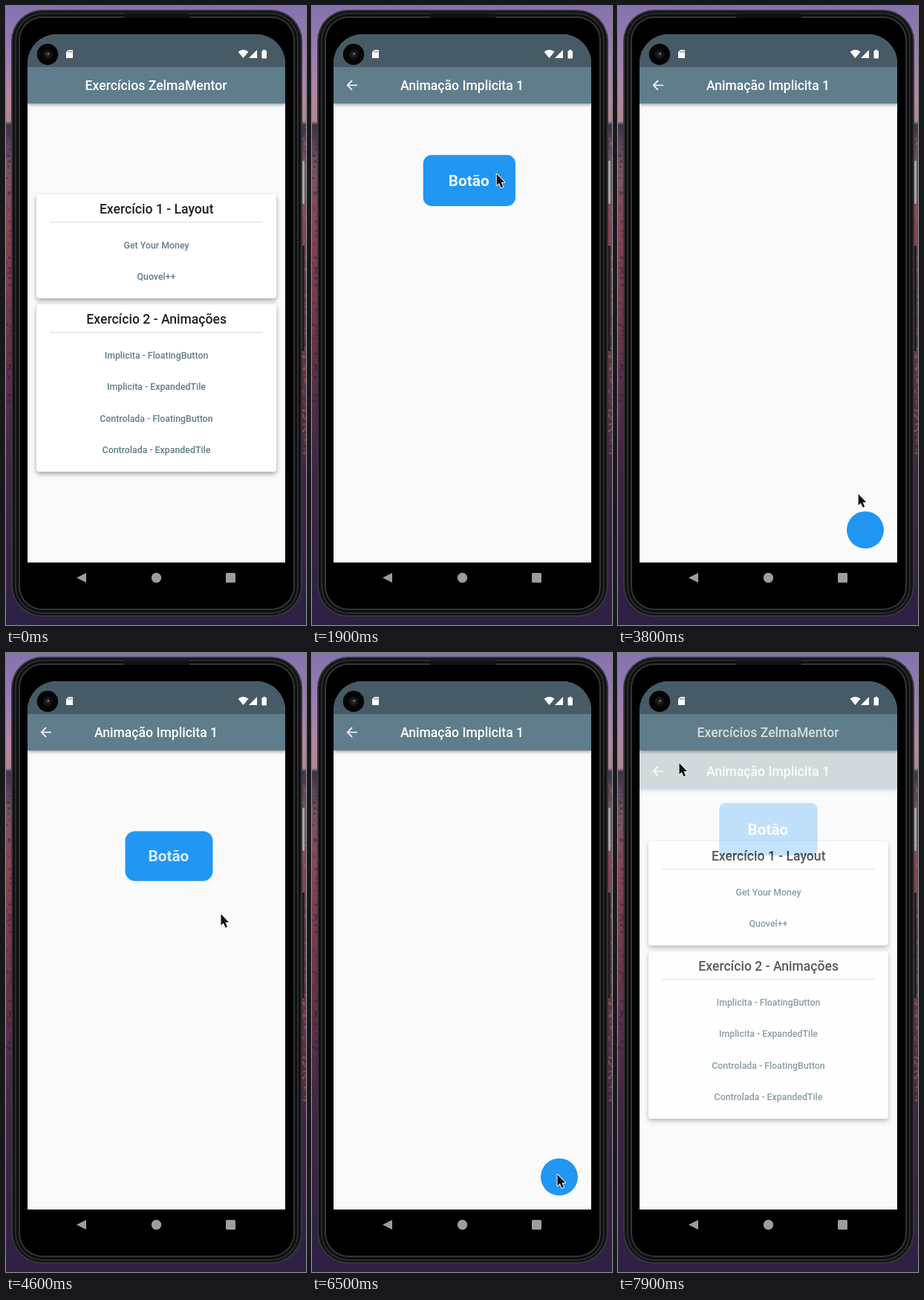
An HTML page with a canvas for the animation above (8000 ms loop, 404 px wide and 832 px high).

```html
<!DOCTYPE html>
<html lang="pt">
<head>
<meta charset="utf-8">
<title>Exercícios</title>
<style>
html, body { margin: 0; width: 100%; height: 100%; overflow: hidden; background: #000; }
canvas { display: block; width: 404px; height: 832px; }
</style>
</head>
<body>
<canvas id="stage" width="404" height="832"></canvas>
<script>
const W = 404, H = 832, LOOP = 8000, STEP = 100;
const ctx = document.getElementById('stage').getContext('2d');
const BG = '#fafafa', BAR = '#5f7d8b', STATUS = '#465b65', BLUE = '#2196f3';

function layer() {
  const c = document.createElement('canvas');
  c.width = W;
  c.height = H;
  return c.getContext('2d');
}

function pageLayer() {
  const c = layer();
  c.rect(29, 38, 347, 710);
  c.clip();
  return c;
}

const clamp = (v, a = 0, b = 1) => Math.min(b, Math.max(a, v));
const mix = (a, b, p) => a + (b - a) * p;

function bezier(x1, y1, x2, y2) {
  const at = (a, b, u) => 3 * a * u * (1 - u) ** 2 + 3 * b * u * u * (1 - u) + u ** 3;
  return x => {
    let lo = 0, hi = 1;
    for (let i = 0; i < 24; i++) {
      const mid = (lo + hi) / 2;
      if (at(x1, x2, mid) < x) lo = mid; else hi = mid;
    }
    return at(y1, y2, (lo + hi) / 2);
  };
}
const slideEase = bezier(0.4, 0, 0.2, 1);
const fadeEase = bezier(0.42, 0, 1, 1);

function box(c, x, y, w, h, r, fill) {
  c.beginPath();
  c.roundRect(x, y, w, h, r);
  c.fillStyle = fill;
  c.fill();
}

function disc(c, x, y, r, fill) {
  c.beginPath();
  c.arc(x, y, r, 0, Math.PI * 2);
  c.fillStyle = fill;
  c.fill();
}

function poly(c, pts, fill) {
  c.beginPath();
  pts.forEach(([x, y]) => c.lineTo(x, y));
  c.closePath();
  c.fillStyle = fill;
  c.fill();
}

function text(c, str, x, y, size, fill, weight = 500) {
  c.font = `${weight} ${size}px Roboto, sans-serif`;
  c.textAlign = 'center';
  c.fillStyle = fill;
  c.fillText(str, x, y);
}

function shadow(c, blur, dy, color) {
  c.shadowBlur = blur;
  c.shadowOffsetY = dy;
  c.shadowColor = color;
}

function noShadow(c) {
  c.shadowColor = 'transparent';
}

// Wallpaper and phone body
function drawPhone(c) {
  const g = c.createLinearGradient(0, 0, 0, H);
  [[0, '#8472ae'], [0.08, '#9c7eb2'], [0.15, '#b487a0'], [0.186, '#ae8694'], [0.192, '#3c3548'],
   [0.26, '#795566'], [0.36, '#844553'], [0.55, '#66354b'], [0.75, '#3e2642'], [1, '#2d2045']]
    .forEach(([p, col]) => g.addColorStop(p, col));
  c.fillStyle = g;
  c.fillRect(0, 0, W, H);

  let seed = 7;
  const rnd = () => (seed = seed * 16807 % 2147483647) / 2147483647;
  const tones = ['#b56a66', '#29203a', '#8a5c70', '#4a2a48'];
  c.globalAlpha = 0.45;
  for (let i = 0; i < 260; i++) {
    const y = 162 + rnd() * 440;
    c.fillStyle = tones[i % 4];
    c.fillRect(i % 2 ? rnd() * 8 : 398 + rnd() * 6, y, 1 + rnd() * 3, 1 + rnd() * 3);
  }
  c.globalAlpha = 1;

  box(c, 399, 208, 3, 58, 1, '#a2a4aa');
  box(c, 398, 322, 4, 142, 1, '#1e1f22');

  [[7, 5, '#35373a'], [9, 7, '#101112'], [12, 9, '#2a2c2d'], [14, 11, '#0d0e0e'],
   [17, 14, '#333536'], [19, 16, '#000']].forEach(([x, y, col]) =>
    box(c, x, y, 406 - 2 * x, 826 - 2 * y, 49 - x, col));
  box(c, 158, 10, 90, 6, 3, '#101112');

  const nav = '#9d9d9d';
  poly(c, [[95, 768.5], [108, 762], [108, 775]], nav);
  disc(c, 202.5, 768.5, 6.7, nav);
  box(c, 296, 762, 13, 13, 1.5, nav);
}

function clipScreen(c) {
  c.beginPath();
  c.roundRect(29, 38, 347, 710, [39, 39, 0, 0]);
  c.clip();
}

function appBar(c, title) {
  c.fillStyle = BG;
  c.fillRect(29, 38, 347, 710);
  shadow(c, 4, 2, 'rgba(0,0,0,.35)');
  c.fillStyle = BAR;
  c.fillRect(29, 38, 347, 93);
  noShadow(c);
  text(c, title, 202, 113, 17.6, '#fff');
}

function card(c, y, h, title, items) {
  shadow(c, 6, 3, 'rgba(0,0,0,.35)');
  box(c, 41, y, 323, h, 4, '#fff');
  noShadow(c);
  text(c, title, 202.7, y + 26, 17.6, '#212121');
  c.fillStyle = '#dedede';
  c.fillRect(59, y + 37, 287, 1.2);
  items.forEach((item, i) => text(c, item, 202.5, y + 73 + i * 42.4, 12.36, '#607d8b'));
}

function drawMenu(c) {
  appBar(c, 'Exercícios ZelmaMentor');
  card(c, 253, 140, 'Exercício 1 - Layout', ['Get Your Money', 'Quovel++']);
  card(c, 401, 225, 'Exercício 2 - Animações', [
    'Implicita - FloatingButton', 'Implicita - ExpandedTile',
    'Controlada - FloatingButton', 'Controlada - ExpandedTile']);
}

function drawStatus(c) {
  c.fillStyle = STATUS;
  c.fillRect(29, 38, 347, 44);
  disc(c, 56, 65, 14.2, '#040404');
  disc(c, 56, 65, 6.5, '#131415');
  disc(c, 56, 65, 3, '#2c2a28');
  disc(c, 57, 64, 1.2, '#80786a');
  poly(c, [[84, 59], [90, 59], [90, 70], [81, 70], [81, 62]], '#fff');
  c.fillStyle = STATUS;
  [84, 86, 88].forEach(x => c.fillRect(x, 60.5, 1, 2));
  c.beginPath();
  c.moveTo(319.5, 70);
  c.lineTo(312.5, 61.5);
  c.quadraticCurveTo(319.5, 56, 326.5, 61.5);
  c.closePath();
  c.fillStyle = '#fff';
  c.fill();
  poly(c, [[327, 70], [338, 70], [338, 59]], '#fff');
  box(c, 344.5, 60, 6.5, 10.5, 1, '#fff');
  c.fillRect(346.3, 58.8, 3, 2);
}

// Button morph: 0 = wide at top centre, 1 = round at bottom right
const TRIP = 500;
const DOWN = [1850, 3300, 4780, 5980], UP = [2686, 4188, 5386, 6632];
const trips = (t, starts) => starts.reduce((sum, s) => sum + clamp((t - s) / TRIP), 0);
const morph = t => trips(t, DOWN) - trips(t, UP);

function drawDetail(c, t) {
  appBar(c, 'Animação Implicita 1');
  c.strokeStyle = '#fff';
  c.lineWidth = 1.7;
  c.beginPath();
  c.moveTo(61, 106.5);
  c.lineTo(48.5, 106.5);
  c.moveTo(54, 100.2);
  c.lineTo(47.8, 106.5);
  c.lineTo(54, 112.8);
  c.stroke();

  const p = morph(t);
  const w = mix(132.5, 50, p), h = mix(70.6, 50, p);
  const cx = 202.5 + p * (311 - w) / 2;
  const cy = 439.2 + (2 * p - 1) * (580 - h) / 2;
  const r = Math.min(mix(8.8, 34, p), h / 2);
  c.save();
  box(c, cx - w / 2, cy - h / 2, w, h, r, BLUE);
  c.clip();
  c.globalAlpha = 1 - p;
  text(c, 'Botão', cx - 0.6, cy + 7.2, 20.8, '#fff', 700);
  c.restore();
}

function drawSplash(c, t) {
  const k = (t - 1050) / 350;
  if (k <= 0 || k >= 1) return;
  c.save();
  c.beginPath();
  c.roundRect(127, 453, 151, 32, 4);
  c.clip();
  c.globalAlpha = 0.14 * Math.min(1, 2 - 2 * k);
  disc(c, 161, 469, 30 + 126 * k, BAR);
  c.restore();
}

// Pointer stops: time, x, y
const PATH = [
  [450, 412, 640], [950, 160, 464], [1400, 160, 464], [1750, 245, 206], [1880, 245, 206],
  [2400, 330, 700], [2690, 330, 700], [3050, 255, 206], [3300, 255, 206], [3850, 330, 700],
  [4190, 330, 700], [4600, 289, 350], [4720, 262, 206], [4800, 262, 206], [5250, 330, 700],
  [5400, 330, 700], [5800, 249, 323], [5900, 244, 206], [5990, 244, 206], [6450, 330, 700],
  [6640, 330, 700], [6950, 412, 640], [7250, 412, 190], [7600, 54, 108], [7750, 54, 108],
  [7900, 82, 147], [8000, 100, 170]
];

function drawPointer(c, t) {
  const i = PATH.findIndex(k => k[0] > t);
  if (i < 1) return;
  const [t0, x0, y0] = PATH[i - 1], [t1, x1, y1] = PATH[i];
  const u = (t - t0) / (t1 - t0);
  c.save();
  c.translate(mix(x0, x1, u) - 0.5, mix(y0, y1, u));
  c.lineJoin = 'round';
  c.lineWidth = 2;
  c.strokeStyle = '#f4f4f4';
  c.beginPath();
  [[1, 1], [1, 16], [4.3, 13], [7, 19], [9.5, 18], [7, 12], [11.5, 12]]
    .forEach(([x, y]) => c.lineTo(x, y));
  c.closePath();
  c.stroke();
  c.fillStyle = '#111';
  c.fill();
  c.restore();
}

const phone = layer(), menu = pageLayer(), detail = pageLayer();

function render(t) {
  ctx.drawImage(phone.canvas, 0, 0);
  ctx.save();
  clipScreen(ctx);
  ctx.drawImage(menu.canvas, 0, 0);
  drawSplash(ctx, t);
  const v = clamp((t - 1116) / 300) - clamp((t - 7735) / 300);
  if (v > 0) {
    drawDetail(detail, t);
    ctx.globalAlpha = fadeEase(v);
    ctx.drawImage(detail.canvas, 0, (1 - slideEase(v)) * 177);
    ctx.globalAlpha = 1;
  }
  drawStatus(ctx);
  ctx.restore();
  drawPointer(ctx, t);
}

function frame(now) {
  render(Math.floor(now % LOOP / STEP) * STEP);
  requestAnimationFrame(frame);
}

drawPhone(phone);
drawMenu(menu);
requestAnimationFrame(frame);
</script>
</body>
</html>
```
